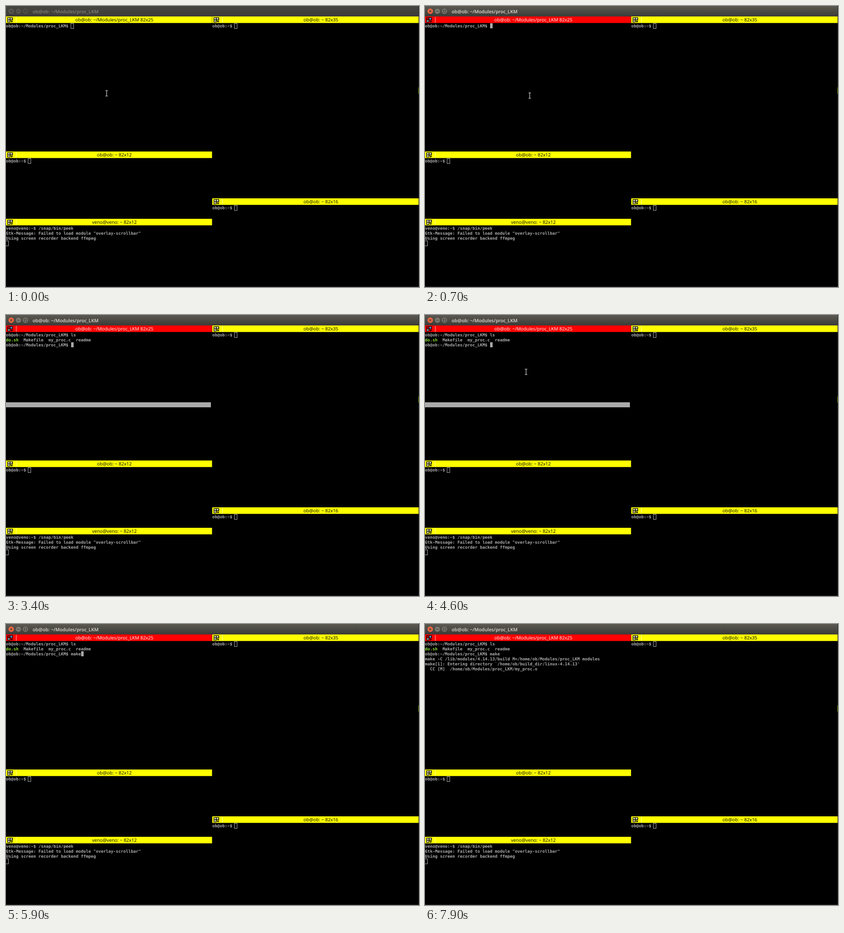
Animation of 907x618 px, one loop 8 s. Source, as an HTML page:

```html
<!DOCTYPE html>
<html lang="en">
<head>
<meta charset="utf-8">
<title>Terminal panes</title>
<style>
  html, body { margin: 0; width: 100%; height: 100%; overflow: hidden; background: #000; }
  svg { display: block; width: 907px; height: 618px; }
  text { white-space: pre; text-rendering: geometricPrecision; }
  .term { font: bold 9.116px "DejaVu Sans Mono", monospace; fill: #aaa; }
  .exec { fill: #8ae234; }
  .bar { font: 10.2px "Open Sans", sans-serif; text-anchor: middle; }
  .title { font: 600 10.3px "Open Sans", sans-serif; fill: #dfdbd2; }
  .hollow { fill: none; stroke: #aaa; }
  .solid { fill: #aaa; }

  .blurred .title { fill: #85827b; }
  .blurred .close { fill: #595852; }
  .blurred .button { fill: #55544f; }
  .blurred .head { fill: url(#dim); }
  .blurred .sign { stroke: #35342f; }
  .head { fill: url(#lit); }
  .close { fill: #ec6540; }
  .button { fill: #7c7a70; }
  .sign { fill: none; stroke: #3c3b37; stroke-width: 1.2; }
</style>
</head>
<body>
<svg id="stage" viewBox="0 0 907 618">
  <defs>
    <linearGradient id="lit" x2="0" y2="1">
      <stop stop-color="#5b5951"/><stop offset="1" stop-color="#3c3b37"/>
    </linearGradient>
    <linearGradient id="dim" x2="0" y2="1">
      <stop stop-color="#474641"/><stop offset="1" stop-color="#3c3b37"/>
    </linearGradient>
  </defs>
  <rect width="907" height="618"/>
  <g id="panes"></g>

  <rect class="head" width="906" height="23"/>
  <circle class="close" cx="11.5" cy="11.5" r="6"/>
  <circle class="button" cx="27.3" cy="11.5" r="5.7"/>
  <circle class="button" cx="42.7" cy="11.5" r="5.7"/>
  <path class="sign" d="M9.3 9.3l4.4 4.4m0-4.4l-4.4 4.4M24.3 11.5h6M40.2 9.2h5v4.6h-5z"/>
  <text class="title" x="58.5" y="15.5">ob@ob: ~/Modules/proc_LKM</text>

  <rect x="906" width="1" height="618" fill="#23282c"/>
  <rect x="906" y="179" width="1" height="14" fill="#8fc31f"/>
  <rect y="617" width="907" height="1" fill="#2b2b2b"/>

  <rect id="selection" class="solid" y="192" width="450" height="11"/>
  <g id="shell"></g>
  <rect id="caret" class="solid" width="5.5" height="11"/>
  <g id="mouse" fill="none">
    <path d="M-3 -6h2.2l.8 .8 .8 -.8h2.2M0 -5.5V5.5M-3 6h2.2l.8 -.8 .8 .8h2.2" stroke="#000" stroke-width="2.6"/>
    <path d="M-2.7 -6h2l.7 .6 .7 -.6h2M0 -5.5V5.5M-2.7 6h2l.7 -.6 .7 .6h2" stroke="#eee" stroke-width="1.1"/>
  </g>
</svg>
<script>
const LOOP = 8000, CELL = 5.488, ROW = 11, TOP = 38;
const $ = id => document.getElementById(id);
const stage = $('stage'), shell = $('shell'), caret = $('caret'), mouse = $('mouse');

const line = (x, top, text) =>
  `<text class="term" x="${x}" y="${top + 8.8}">${text}</text>`;
const hollow = (x, top) =>
  `<rect class="hollow" x="${x - 0.5}" y="${top + 0.5}" width="6" height="11"/>`;

// Grid of small windows with a drop-down arrow
function icon(x, y, red) {
  const [a, b, c] = red ? ['#c00', '#5b9bd5', '#999'] : Array(3).fill('#d8d8a8');
  return `<g transform="translate(${x + 3} ${y + 2})">
    <path d="M0 0h12v6.5h-5.5v4.5h-6.5z"/>
    <path fill="${a}" d="M1.2 1.2h4v3.6h-4z"/>
    <path fill="${b}" d="M6.6 1.2h4v3.6h-4z"/>
    <path fill="${c}" d="M1.2 6.2h4v3.6h-4z"/>
    <path d="M6.8 8h5.6l-2.8 3.2z"/></g>`;
}

function bar(x, y, width, label, red) {
  return `<rect x="${x}" y="${y}" width="${width}" height="14.4" fill="${red ? '#f00' : '#ff0'}"/>
    ${icon(x, y, red)}
    <path d="M${x + 22.5} ${y + 1}v13" stroke="${red ? '#fbb' : '#ffffa0'}"/>
    <text class="bar" x="${x + (x ? 238.5 : 238)}" y="${y + 10.9}" fill="${red ? '#fff' : '#000'}">${label}</text>`;
}

function idlePane(x, y, width, size) {
  const top = y + 15;
  return bar(x, y, width, `ob@ob: ~ ${size}`) + line(x, top, 'ob@ob:~$ ') +
    hollow(Math.round(x + 9 * CELL), top);
}

const mainBar = red => bar(0, 23, 452.5, 'ob@ob: ~/Modules/proc_LKM 82x25', red);
const logPane = bar(0, 468, 452.5, 'veno@veno: ~ 82x12') +
  ['veno@veno:~$ /snap/bin/peek',
   'Gtk-Message: Failed to load module "overlay-scrollbar"',
   'Using screen recorder backend ffmpeg'].map((s, i) => line(0, 483.3 + i * ROW, s)).join('') +
  hollow(0, 516);

$('panes').innerHTML = `<g id="calm">${mainBar(false)}</g><g id="active">${mainBar(true)}</g>` +
  idlePane(453, 23, 453, '82x35') + idlePane(0, 320, 452.5, '82x12') +
  idlePane(453, 423, 453, '82x16') + logPane;

const PROMPT = 'ob@ob:~/Modules/proc_LKM$ ';
const LISTING = '<tspan class="exec">do.sh</tspan>  Makefile  my_proc.c  readme';
const BUILD = [
  [6100, 'make -C /lib/modules/4.14.13/build M=/home/ob/Modules/proc_LKM modules'],
  [7300, "make[1]: Entering directory `/home/ob/build_dir/linux-4.14.13'"],
  [7600, '  CC [M]  /home/ob/Modules/proc_LKM/my_proc.o']
];
const BLINKS = [[1300, 1900], [4000, 4600], [5200, 5600], [6700, 7300], [7900, LOOP]];
// [time, x, y]; no place means hidden
const MOUSE = [[0, 221, 192], [400, 226, 195], [500, 230, 197], [3000],
  [4400, 230, 195], [4500, 229, 158], [4600, 222, 125], [5600]];

const within = (t, [from, to]) => t >= from && t < to;
const typed = (word, start, t) =>
  word.slice(0, Math.max(0, Math.floor((t - start) / 100) + 1));
const show = (el, on) => el.setAttribute('visibility', on ? 'visible' : 'hidden');

function screen(t) {
  const rows = [PROMPT + typed('ls', 3000, t)];
  if (t >= 3400) rows.push(LISTING, PROMPT + typed('make', 5600, t));
  if (t >= 6100) rows.push(...BUILD.filter(b => t >= b[0]).map(b => b[1]), '');
  return rows;
}

let last = '';
function draw() {
  const t = performance.now() % LOOP, focused = t >= 700;
  stage.classList.toggle('blurred', !focused);
  show($('active'), focused);
  show($('calm'), !focused);
  show($('selection'), within(t, [900, 5000]));

  const rows = screen(t);
  const markup = rows.map((s, i) => line(0, TOP + i * ROW, s)).join('');
  if (markup !== last) shell.innerHTML = last = markup;

  const x = Math.round(rows.at(-1).length * CELL), y = TOP + (rows.length - 1) * ROW;
  caret.setAttribute('x', focused ? x : x - 0.5);
  caret.setAttribute('y', focused ? y : y + 0.5);
  caret.setAttribute('width', focused ? 5.5 : 6);
  caret.setAttribute('class', focused ? 'solid' : 'hollow');
  show(caret, !BLINKS.some(b => within(t, b)));

  const [, mx, my] = MOUSE.findLast(m => t >= m[0]);
  show(mouse, mx !== undefined);
  if (mx !== undefined) mouse.setAttribute('transform', `translate(${mx} ${my})`);
  requestAnimationFrame(draw);
}
draw();
</script>
</body>
</html>
```
